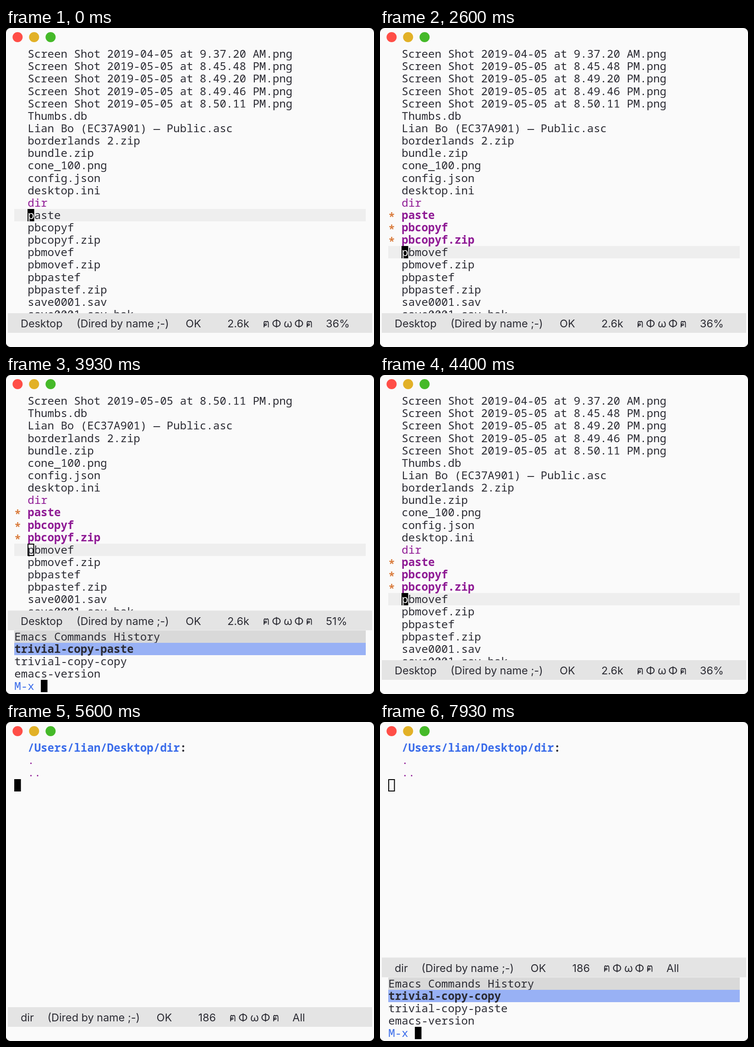
Recreate the animation shown at these times as an HTML page. Size 803x698 px, loop 8000 ms.

```html
<!DOCTYPE html>
<html lang="en">
<head>
<meta charset="utf-8">
<title>File manager</title>
<style>
html, body { margin: 0; width: 100%; height: 100%; overflow: hidden; background: #000; }
svg { display: block; }
text { white-space: pre; fill: #2b2b33; }
.mono { font: 500 24.08px "Noto Sans Mono", "DejaVu Sans Mono", monospace; }
.mode { font: 400 23.4px Inter, "Open Sans", sans-serif; }
.bold { font-weight: 700; }
.dir { fill: #8f1b95; }
.star { fill: #d97b3c; transform: translateY(4px); }
.blue { fill: #3a6cea; }
.inverse { fill: #fafafa; }
</style>
</head>
<body>
<svg id="stage" width="803" height="698" viewBox="0 0 803 698"></svg>
<script>
const LOOP = 8000, BG = '#fafafa';
const LEFT = 18.3, CHAR = 14.45, TOP = 43.4, LINE = 27.13;
const FILES = [
  'Screen Shot 2019-04-05 at 9.37.20 AM.png',
  'Screen Shot 2019-05-05 at 8.45.48 PM.png',
  'Screen Shot 2019-05-05 at 8.49.20 PM.png',
  'Screen Shot 2019-05-05 at 8.49.46 PM.png',
  'Screen Shot 2019-05-05 at 8.50.11 PM.png',
  'Thumbs.db', 'Lian Bo (EC37A901) — Public.asc', 'borderlands 2.zip',
  'bundle.zip', 'cone_100.png', 'config.json', 'desktop.ini', 'dir',
  'paste', 'pbcopyf', 'pbcopyf.zip', 'pbmovef', 'pbmovef.zip',
  'pbpastef', 'pbpastef.zip', 'save0001.sav', 'save0001.sav.bak'
];
const DIR = 12, FIRST = 13;

// Each entry changes part of the state at its time in ms.
const EVENTS = [
  [0, { folder: 'Desktop', point: FIRST, marks: 0, menu: null, pick: 0 }],
  [1870, { point: FIRST + 1, marks: 1 }],
  [2070, { point: FIRST + 2, marks: 2 }],
  [2270, { point: FIRST + 3, marks: 3 }],
  [3070, { menu: ['trivial-copy-paste', 'trivial-copy-copy', 'emacs-version'] }],
  [4070, { pick: 1 }],
  [4270, { menu: null, pick: 0 }],
  [4670, { point: 15 }],
  [4800, { point: 14 }],
  [4930, { point: 13 }],
  [5070, { point: DIR }],
  [5530, { folder: 'dir' }],
  [7500, { menu: ['trivial-copy-copy', 'trivial-copy-paste', 'emacs-version'] }]
];

const colX = col => LEFT + col * CHAR;
const rowY = row => Math.round(TOP + row * LINE);
const rect = (x, y, w, h, fill) =>
  `<rect x="${x}" y="${y}" width="${w}" height="${h}" fill="${fill}"/>`;
const bar = (row, fill) => rect(18, rowY(row), 767, 27, fill);
const text = (str, col, row, style = '') =>
  `<text class="mono ${style}" x="${colX(col)}" y="${TOP + row * LINE + 21.8}">${str}</text>`;
const label = (str, x, y) => `<text class="mode" x="${x}" y="${y}">${str}</text>`;

function cursor(col, row, char, hollow) {
  const x = Math.round(colX(col)), y = rowY(row);
  if (hollow)
    return `<rect x="${x + 1}" y="${y + 1}" width="12.5" height="25" fill="none" stroke="#000" stroke-width="2"/>`;
  return rect(x, y, 14.5, 27, '#000') + text(char, col, row, 'inverse');
}

function fileList(s) {
  const scroll = s.menu ? 4 : 0;
  let out = bar(s.point - scroll, '#eee');
  for (let i = scroll; i < FILES.length; i++) {
    const row = i - scroll;
    const marked = i >= FIRST && i < FIRST + s.marks;
    if (marked) out += text('*', 0, row, 'bold star');
    out += text(FILES[i], 2, row, marked ? 'bold dir' : i === DIR ? 'dir' : '');
  }
  return out + cursor(2, s.point - scroll, FILES[s.point][0], s.menu);
}

function emptyFolder(s) {
  return text('/Users/lian/Desktop/dir', 2, 0, 'bold blue') + text(':', 25, 0, 'bold') +
    text('.', 2, 1, 'dir') + text('..', 2, 2, 'dir') + cursor(0, 3, '', s.menu);
}

const paw = (x, y) =>
  `<path transform="translate(${x} ${y})" fill="none" stroke="#2b2b33" stroke-width="1.8"
    d="M2 0V-9Q2-13 4.5-13L6.5-11.5L8.5-13Q11.5-13 11.5-9V0M2-2L4-4.5"/>
  <circle cx="${x + 5.5}" cy="${y - 6}" r="1.9" fill="none" stroke="#2b2b33" stroke-width="1.6"/>`;

function modeLine(s) {
  const y = s.menu ? 515.5 : 624, base = y + 31;
  const desktop = s.folder === 'Desktop';
  const shift = desktop ? 0 : -63.5;
  const face = desktop ? 561 : 488;
  return rect(0, y, 803, 698 - y, BG) + rect(4, y, 795, 43, '#e4e4e4') +
    label(s.folder, 32, base) +
    label('(Dired by name ;-)', 154 + shift, base) +
    label('OK', 392 + shift, base) +
    label(desktop ? '2.6k' : '186', 483 + shift, base) +
    paw(face, base) + label('Φ', face + 19, base) + label('ω', face + 45, base) +
    label('Φ', face + 68, base) + paw(face + 94, base) +
    label(!desktop ? 'All' : s.menu ? '51%' : '36%', face + 137, base);
}

function menu(s) {
  if (!s.menu) return '';
  let out = bar(19, '#d9d9d9') + text('Emacs Commands History', 0, 19) +
    bar(20 + s.pick, '#98b1f5');
  s.menu.forEach((name, i) => out += text(name, 0, 20 + i, i === s.pick ? 'bold' : ''));
  return out + text('M-x', 0, 23, 'blue') + cursor(4, 23, '');
}

const lights = ['#ff4e47', '#e2b127', '#45b929'].map((fill, i) =>
  `<circle cx="${25.3 + 36 * i}" cy="20" r="11" fill="${fill}"/>`).join('');

function draw(s) {
  return `<rect width="803" height="698" rx="10" fill="${BG}"/>` + lights +
    '<clipPath id="window"><rect width="803" height="698" rx="10"/></clipPath>' +
    '<g clip-path="url(#window)">' +
    (s.folder === 'dir' ? emptyFolder(s) : fileList(s)) + modeLine(s) + menu(s) + '</g>';
}

const stage = document.getElementById('stage');
const start = performance.now();
let shown = 0;

function tick() {
  const t = (performance.now() - start) % LOOP;
  const past = EVENTS.filter(([time]) => time <= t);
  if (past.length !== shown) {
    shown = past.length;
    stage.innerHTML = draw(Object.assign({}, ...past.map(([, change]) => change)));
  }
  requestAnimationFrame(tick);
}
tick();
</script>
</body>
</html>
```
